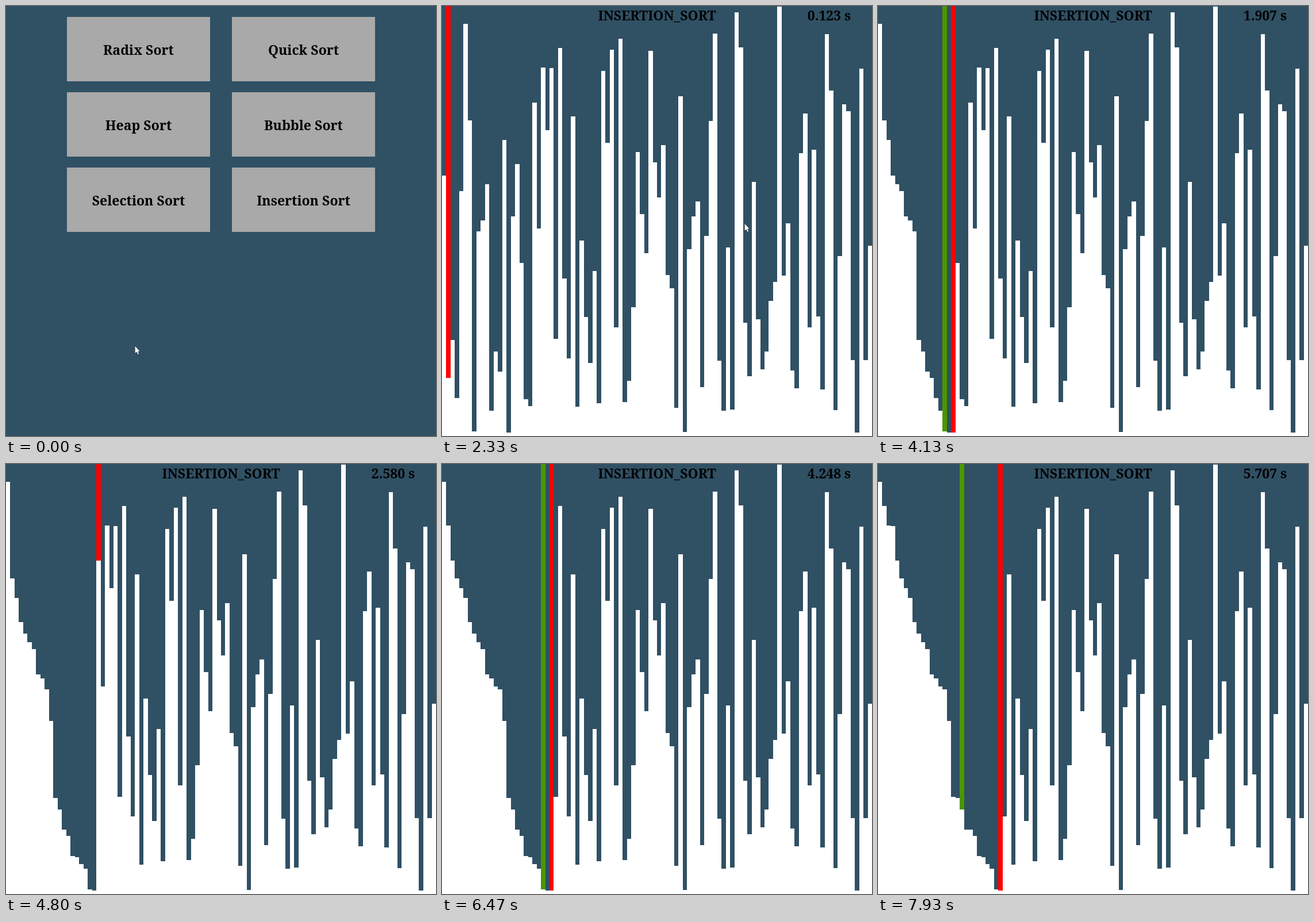
Recreate the animation shown at these times as an HTML page with a canvas. Size 748x748 px, loop 8 s.

```html
<!DOCTYPE html>
<html lang="en">
<head>
<meta charset="utf-8">
<title>Insertion sort</title>
<style>
html, body { margin: 0; width: 100%; height: 100%; overflow: hidden; background: #305064; }
canvas { display: block; }
</style>
</head>
<body>
<canvas id="stage" width="748" height="748"></canvas>
<script>
const SIZE = 748, LOOP = 8000, FPS = 15, START = 2330;
const NAVY = '#305064', GRAY = '#a9a9a9', HOVER = '#808080', GREEN = '#4b9600';
const ctx = document.getElementById('stage').getContext('2d');

const values = [
  295, 647, 581, 682, 322, 31, 199, 740, 392, 373, 310, 704, 601, 636, 233, 742, 366, 275, 447, 684,
  696, 168, 387, 107, 216, 108, 579, 73, 474, 613, 192, 697, 408, 541, 621, 461, 691, 113, 238, 76,
  559, 57, 689, 652, 524, 254, 362, 430, 78, 272, 333, 242, 468, 491, 699, 157, 741, 423, 366, 340,
  663, 400, 200, 48, 617, 704, 420, 702, 11, 72, 551, 644, 306, 545, 632, 601, 513, 480, 1, 469,
  378, 634, 665, 256, 187, 559, 250, 540, 667, 49, 147, 703, 435, 171, 183, 616, 742, 109, 616, 417
];
const labels = ['Radix Sort', 'Quick Sort', 'Heap Sort', 'Bubble Sort', 'Selection Sort', 'Insertion Sort'];

// [tick, sort steps done, stopwatch ms]
const progress = [[35, 0, 123], [47, 38, 913], [62, 78, 1907], [82, 141, 3254], [97, 188, 4248], [119, 257, 5707]];
// [ms, x, y] of the pointer tip
const pointer = [
  [0, 224, 591], [70, 224, 591], [270, 213, 605], [470, 330, 592], [800, 553, 523],
  [940, 553, 523], [1200, 526, 378], [2530, 526, 378], [3130, 745, 435], [3200, 760, 439]
];

// Linear interpolation through rows whose first column is the time.
function track(rows, t) {
  const last = rows[rows.length - 1];
  if (t >= last[0]) return last.slice(1);
  const k = Math.max(1, rows.findIndex(row => row[0] > t));
  const [a, b] = [rows[k - 1], rows[k]];
  const f = Math.max(0, (t - a[0]) / (b[0] - a[0]));
  return a.slice(1).map((v, c) => v + (b[c + 1] - v) * f);
}

// Insertion sort stopped after the given number of visible steps.
function sortAt(steps) {
  const a = [...values];
  for (let i = 1; i < a.length; i++) {
    const key = a[i];
    let j = i - 1;
    if (!steps--) return { a, i, j: -1 };
    while (j >= 0 && a[j] > key) {
      a[j + 1] = a[j--];
      if (!steps--) return { a, i, j };
    }
    a[j + 1] = key;
  }
}

function rect(color, x, y, w, h) {
  ctx.fillStyle = color;
  ctx.fillRect(x, y, w, h);
}

function text(str, x, y, size) {
  ctx.font = `700 ${size}px "Noto Serif", serif`;
  ctx.textAlign = 'center';
  ctx.fillStyle = '#000';
  ctx.fillText(str, x, y);
}

function drawMenu(hovered) {
  rect(NAVY, 0, 0, SIZE, SIZE);
  labels.forEach((label, n) => {
    const x = n % 2 ? 393 : 106, y = 19 + 131 * (n >> 1);
    rect(hovered && n === 5 ? HOVER : GRAY, x, y, 249, 112);
    text(label, x + 124.5, y + 66, 23);
  });
}

function drawSort(tick) {
  const [steps, ms] = track(progress, tick);
  const { a, i, j } = sortAt(Math.floor(steps));
  const edge = n => Math.round(n * SIZE / a.length);
  rect('#fff', 0, 0, SIZE, SIZE);
  a.forEach((v, n) => {
    rect(n === i ? '#f00' : n === j ? GREEN : NAVY, edge(n), 0, edge(n + 1) - edge(n), v);
  });
  text('INSERTION_SORT', 374, 25, 23);
  text((ms / 1000).toFixed(3) + ' s', 673.5, 25, 23);
}

function drawPointer(x, y) {
  ctx.save();
  ctx.translate(x + 0.5, y + 0.5);
  ctx.fillStyle = '#fff';
  ctx.strokeStyle = '#000';
  ctx.lineWidth = 1;
  ctx.stroke(arrow);
  ctx.fill(arrow);
  ctx.restore();
}
const arrow = new Path2D('M0 0V12.5L2.8 10L4.8 14.5L6.8 13.6L4.8 9.2H8.3Z');

function draw(now) {
  const t = now % LOOP;
  const tick = Math.min(119, Math.floor((t + 4) * FPS / 1000));
  const time = tick * 1000 / FPS + 4;
  const [x, y] = track(pointer, time);
  if (time < START) drawMenu(y < 393);
  else drawSort(tick);
  if (x < SIZE) drawPointer(Math.round(x), Math.round(y));
}

const begin = performance.now();
(function loop() {
  draw(performance.now() - begin);
  requestAnimationFrame(loop);
})();
</script>
</body>
</html>
```
